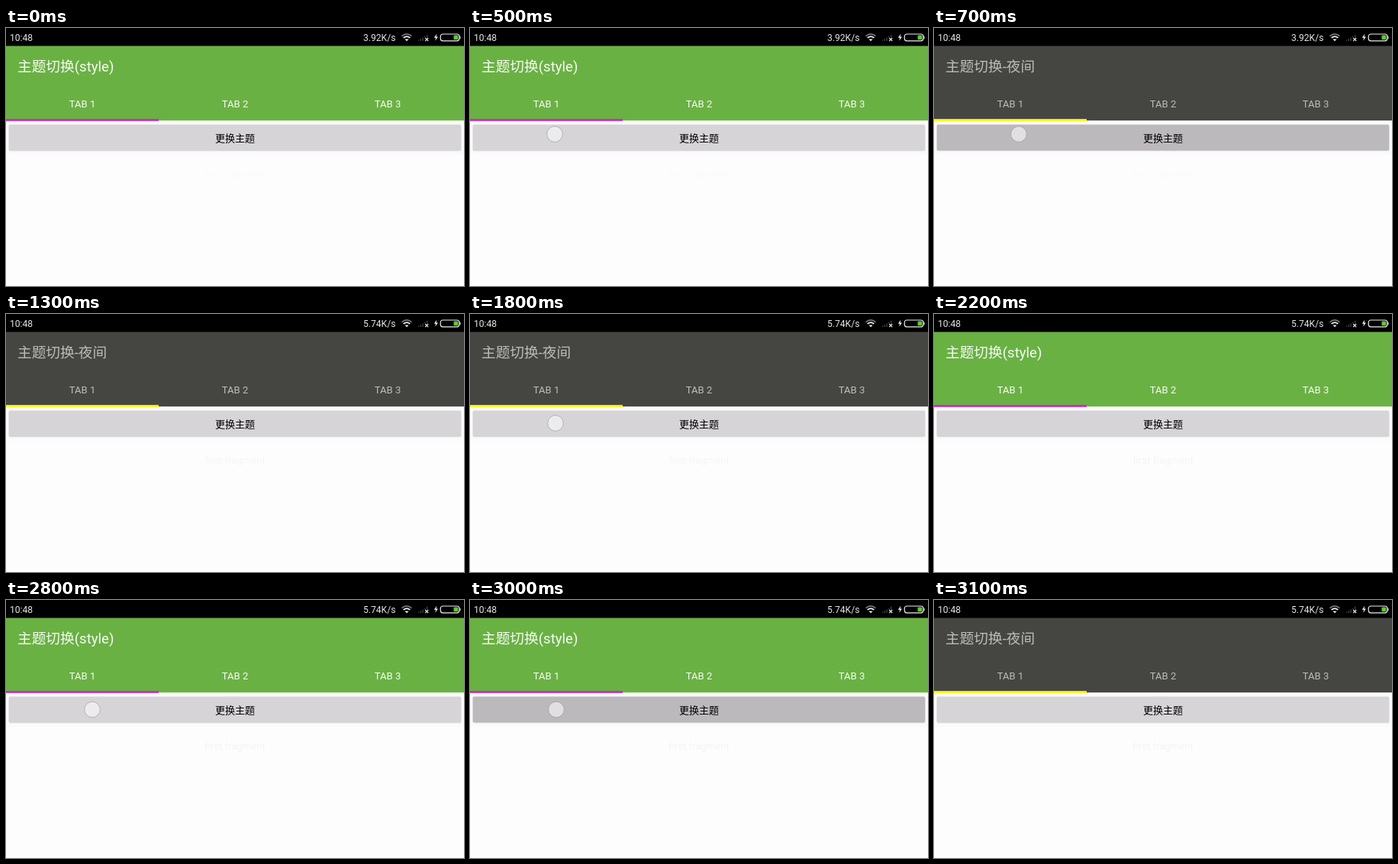
An HTML page that plays this animation: 600 by 338 pixels, repeating every 3200 ms.

```html
<!DOCTYPE html>
<html lang="zh-CN">
<head>
<meta charset="utf-8">
<title>主题切换</title>
<style>
  html, body { margin: 0; height: 100%; overflow: hidden; background: #fefdfe; }
  svg { display: block; width: 100%; height: 100%; }
  text { font-family: Roboto, "Noto Sans CJK SC", "Noto Sans CJK", sans-serif; font-size: 13.07px; }
  .mid { text-anchor: middle; }
  .status { font-size: 12.1px; fill: #e6e6e6; }
  #title { font-size: 18.67px; }
</style>
</head>
<body>
<svg viewBox="0 0 600 338">
  <rect width="600" height="338" fill="#fefdfe"/>
  <rect y="121" width="600" height="45" fill="#fafafa"/>
  <rect width="600" height="24" fill="#000"/>

  <text class="status" x="5" y="17">10:48</text>
  <text class="status" id="speed" x="468" y="17"></text>
  <g fill="none" stroke="#eee" stroke-width="1.6">
    <path d="M518.5 10.6Q525 5 531.5 10.6" stroke="#777"/>
    <path d="M520.6 12.9Q525 9.2 529.4 12.9"/>
    <path d="M522.4 14.4h5.2L525 17.2z" fill="#eee" stroke="none"/>
    <path d="M540.5 17v-1.5M543.3 17v-3M546.1 17v-4.6M548.9 12.5V10.5M551.7 12.5V8.5" stroke="#444" stroke-width="1.3"/>
    <path d="M549.2 13l4 4m0-4l-4 4" stroke-width="1.1"/>
    <path d="M564.4 7.5l-3.6 5.2h2.3l-.9 4 3.7-5.3h-2.3z" fill="#eee" stroke="none"/>
    <rect x="569.2" y="8" width="24.6" height="8.8" rx="3" stroke-width="1.2"/>
    <path d="M595 10.8v3.2" stroke-width="1.1"/>
    <rect x="586.5" y="9.6" width="5.8" height="5.6" rx="1" fill="#5fc832" stroke="none"/>
  </g>

  <rect id="bar" y="23.5" width="600" height="97.7"/>
  <g id="labels">
    <text id="title" x="15" y="57"></text>
    <text class="mid" x="100" y="104">TAB 1</text>
    <text class="mid" x="300" y="104">TAB 2</text>
    <text class="mid" x="500" y="104">TAB 3</text>
  </g>
  <rect id="indicator" y="119.2" width="200" height="2.6"/>

  <rect x="3.7" y="127.4" width="592.6" height="33.8" rx="2" fill="#000" opacity=".13"/>
  <rect id="button" x="3.7" y="126.6" width="592.6" height="33.8" rx="2"/>
  <text class="mid" x="300" y="149.3">更换主题</text>
  <text class="mid" id="content" x="300" y="195.5">first fragment</text>
  <circle id="touch" r="10.3" fill="#fff" fill-opacity=".55" stroke="#8c8c9b" stroke-opacity=".6" stroke-width=".9"/>
</svg>
<script>
  const LOOP = 3200;
  const el = id => document.getElementById(id);

  const themes = {
    day: { title: '主题切换(style)', bar: '#6ab144', text: '#f6faf3', accent: '#d51fd0' },
    night: { title: '主题切换-夜间', bar: '#454641', text: '#bcbdba', accent: '#ffff00' }
  };

  // Each step changes only the listed properties.
  const steps = [
    [0, { theme: 'day', speed: '3.92K/s', pressed: false, touch: null, content: '#fbf9fb' }],
    [500, { touch: [111, 139] }],
    [700, { theme: 'night', pressed: true }],
    [800, { pressed: false, touch: null }],
    [1300, { speed: '5.74K/s', content: '#f6f4f7' }],
    [1800, { touch: [112, 143] }],
    [2000, { pressed: true }],
    [2100, { theme: 'day' }],
    [2200, { pressed: false, touch: null, content: '#f4f3f6' }],
    [2800, { touch: [113, 143.5] }],
    [3000, { pressed: true }],
    [3100, { theme: 'night', pressed: false, touch: null }]
  ];

  function draw(time) {
    const state = Object.assign({}, ...steps.filter(([at]) => at <= time).map(([, change]) => change));
    const theme = themes[state.theme];
    const paint = (id, color) => el(id).setAttribute('fill', color);

    el('title').textContent = theme.title;
    el('speed').textContent = state.speed;
    paint('bar', theme.bar);
    paint('labels', theme.text);
    paint('indicator', theme.accent);
    paint('button', state.pressed ? '#bcb9bd' : '#d6d4d7');
    paint('content', state.content);

    const [x, y] = state.touch || [-50, -50];
    el('touch').setAttribute('cx', x);
    el('touch').setAttribute('cy', y);
  }

  const start = performance.now();
  function tick() {
    draw((performance.now() - start) % LOOP);
    requestAnimationFrame(tick);
  }
  tick();
</script>
</body>
</html>
```
